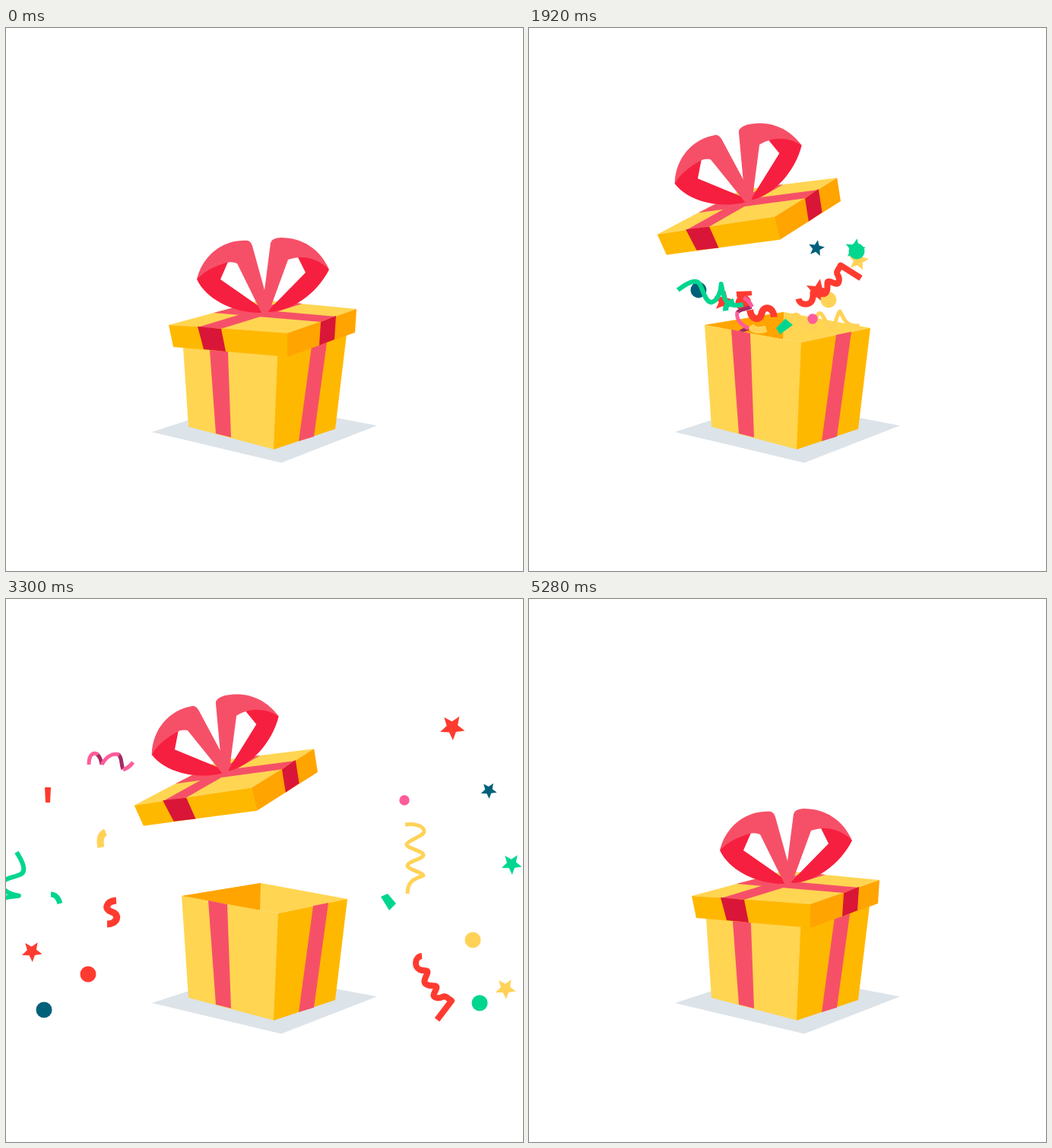
Animation, 680 px wide and 715 px high, one loop 6.24 s. Source, as an HTML page:

```html
<!DOCTYPE html>
<html lang="en">
<head>
<meta charset="utf-8">
<title>Gift box</title>
<style>
html, body { margin: 0; width: 100%; height: 100%; overflow: hidden; background: #fff; }
svg { display: block; width: 100%; height: 100%; }
</style>
</head>
<body>
<svg viewBox="0 0 680 715" xmlns="http://www.w3.org/2000/svg">
  <path fill="#dce3e9" d="M192 532L362 572.5L488 523.5L317 491Z"/>
  <g class="sway">
    <path fill="#ffd552" d="M231 391L335 374L449 395L358 414Z"/>
    <path fill="#ffa400" d="M231 391L335 374L334 410Z"/>
  </g>
  <g id="confetti"></g>
  <g class="sway">
    <path fill="#ffd552" d="M231 391L358.5 414L353 555L240 525Z"/>
    <path fill="#ffb800" d="M358 414L449 395L433 528L352 555Z"/>
    <path fill="#f65068" d="M266 397L291 402L296 539L276 534ZM404 404L424 400L405 538L385 544Z"/>
  </g>
  <g class="sway">
    <g id="lid">
      <path fill="#ffd552" d="M214 391L336 358L461 370L371 402Z"/>
      <path fill="#f65068" d="M252 394L365 360L390 363L283 396ZM273 375L300 368L434 380L414 387Z"/>
      <path fill="#ffb800" d="M214 391L371 402L370 433L220 420Z"/>
      <path fill="#ffa400" d="M370 402L461 370L459 401L370 433Z"/>
      <path fill="#d91637" d="M252 393L283 396L289 426L260 423ZM414 387L434 379L432 410L412 418Z"/>
      <path fill="#f71f3f" d="M251 331C263 357 300 376 336 375L335 368L282 331L292 308C275 308 260 314 251 331Z
        M425 318C409 350 375 374 344 374L349 368L394 322L384 302C400 297 414 302 425 318Z"/>
      <path fill="#f65068" d="M251 331C259 298 287 278 318 280Q322 281 324 287L340 345L348 283Q349 277 361 276
        C390 276 413 291 425 318C411 304 392 298 371 305L348 368L344 375H336L304 310Q297 307 290 309C273 314 260 321 251 331Z"/>
    </g>
  </g>
</svg>
<script>
const LOOP = 6240, STEP = 60;
const BURST = 1600, OUT = 1920, LAND = 3300, GONE = 4080;
const RED = '#ff3b30', GREEN = '#00d68f', YELLOW = '#ffd257',
      NAVY = '#00607a', PINK = '#ff5c9a', PLUM = '#a52a62';

const layer = document.getElementById('confetti');
const lid = document.getElementById('lid');
const sways = document.querySelectorAll('.sway');
const pieces = [];

const mix = (a, b, k) => a + (b - a) * k;
const span = (t, a, b) => Math.max(0, Math.min(1, (t - a) / (b - a)));
const ease = (t, a, b) => { const k = span(t, a, b); return k * k * (3 - 2 * k); };

// A piece flies from one point, just clear of the box, to another.
function add(art, from, to, lift = 27) {
  const g = document.createElementNS('http://www.w3.org/2000/svg', 'g');
  g.innerHTML = art;
  layer.appendChild(g);
  pieces.push({ g, from, to, lift });
}

const fill = (color, d) => `<path fill="${color}" d="${d}"/>`;
const stroke = (color, w, d) =>
  `<path fill="none" stroke="${color}" stroke-width="${w}" stroke-linejoin="round" d="${d}"/>`;
const dot = (color, r) => `<circle r="${r}" fill="${color}"/>`;

function star(color, r) {
  const pts = Array.from({ length: 10 }, (_, i) => {
    const a = (i * 36 - 57) * Math.PI / 180, q = i % 2 ? r * 0.45 : r;
    return `${q * Math.cos(a)} ${q * Math.sin(a)}`;
  });
  return fill(color, `M${pts.join('L')}Z`);
}

// Yellow streamer
add(stroke(YELLOW, 5, 'M-13-45C2-47 12-42 12-36S-10-24-11-19S11-10 11-5S-10 4-10 9S10 18 11 22C4 26-10 26-10 46'),
  [388, 386], [538, 342]);

add(star(RED, 14), [256, 360], [34, 464]);
add(star(RED, 17), [380, 347], [587, 169]);
add(star(YELLOW, 14), [433, 306], [657, 513]);
add(star(GREEN, 14), [429, 291], [665, 349], 85);
add(star(NAVY, 11), [378, 290], [635, 252], 85);

add(dot(NAVY, 10.5), [223, 345], [50, 541]);
add(dot(RED, 10.5), [282, 362], [108, 494]);
add(dot(GREEN, 10.5), [431, 294], [623, 532]);
add(dot(YELLOW, 10.5), [394, 358], [614, 449]);
add(dot(PINK, 6.7), [373, 383], [524, 265]);

// Scraps
add(fill(RED, 'M-4-10H4L3 10H-3Z'), [283, 350], [55, 258]);
add(stroke(YELLOW, 9, 'M5-9C-2-6-3 2-1 11'), [301, 396], [126, 316]);
add(stroke(GREEN, 7, 'M-6-4C0-4 4 1 6 8'), [262, 366], [65, 393]);
add(fill(GREEN, 'M-10-7L-1-11L10 2L1 11Z'), [336, 393], [503, 399]);
add(stroke(RED, 9, 'M6-15C-8-14-10-3 0 0C11 3 8 16-6 16'), [306, 376], [139, 412]);

// Streamers
add('<g transform="rotate(32)">' +
    stroke(GREEN, 6, 'M-17-42C-4-36 8-28 3-20C-2-12-16-2-11 5C-5 11 8 9 16 5C8 12-6 20-2 30C-1 36 2 39 5 43') + '</g>',
  [241, 349], [6, 378]);
add(stroke(PLUM, 5, 'M-18-9C-15-7-12-2-11 5M11-8C16-4 14 5 17 11') +
    stroke(PINK, 5, 'M-28 5C-28-12-19-11-16-8M-11 5C-6-4 2-11 12-8M17 12C22 10 26 8 30 2'),
  [283, 385], [137, 213]);
add(stroke(RED, 8, 'M-16-42C-26-41-26-27-19-24S-7-25-9-19S-16-7-9-4S5-5 3 1S-4 11 3 13S12 9 16 12L23 17L4 42'),
  [395, 337], [563, 512]);

function drawPiece({ g, from, to, lift }, t) {
  const coast = 200 * (1 - Math.exp(-Math.max(0, t - LAND) / 200));
  const k = (Math.min(t, LAND) + coast - OUT) / (LAND - OUT);
  const bow = 4 * k * (1 - k);
  const dx = to[0] - from[0], dy = to[1] - from[1];
  // The farther a piece falls, the sooner it loses its sideways speed.
  const drag = 0.11 + 0.00063 * dy;
  const free = ease(t, BURST, OUT);
  const x = mix(335, from[0] + dx * (k + bow * drag), free);
  const y = mix(445, from[1] + dy * k - lift * bow, free);
  const size = mix(0.3, 1, free) * (1 - ease(t, 3480, GONE));
  g.setAttribute('visibility', t > BURST && t < GONE ? 'visible' : 'hidden');
  g.setAttribute('transform', `translate(${x} ${y}) rotate(${95 * (k - 1)}) scale(${size})`);
}

// 0 is shut, 1 is open; the lid rises a little more before it drops.
function openness(t) {
  if (t < 4560) return ease(t, 1290, 1800) + 0.025 * ease(t, 4440, 4560);
  return 1.025 * (1 - span(t, 4560, 5280)) ** 1.4;
}

function drawLid(t) {
  const s = openness(t), bend = 2 * s * (1 - s);
  const x = -52.3 * (s * s - 0.15 * bend);
  const y = -146.6 * (s * s + 0.57 * bend);
  lid.setAttribute('transform', `translate(${x} ${y}) rotate(${-12.6 * s} 341 373)`);
}

// One lean to the left, then a smaller one to the right.
const swayAngle = t =>
  0.4 * Math.sin(Math.PI * span(t, 690, 960)) - Math.sin(Math.PI * span(t, 0, 690));

function draw(t) {
  sways.forEach(g => g.setAttribute('transform', `rotate(${swayAngle(t)} 350 550)`));
  drawLid(t);
  pieces.forEach(p => drawPiece(p, t));
}

const start = performance.now();
function tick() {
  const t = (performance.now() - start) % LOOP;
  draw(Math.floor(t / STEP) * STEP);
  requestAnimationFrame(tick);
}
draw(0);
requestAnimationFrame(tick);
</script>
</body>
</html>
```
